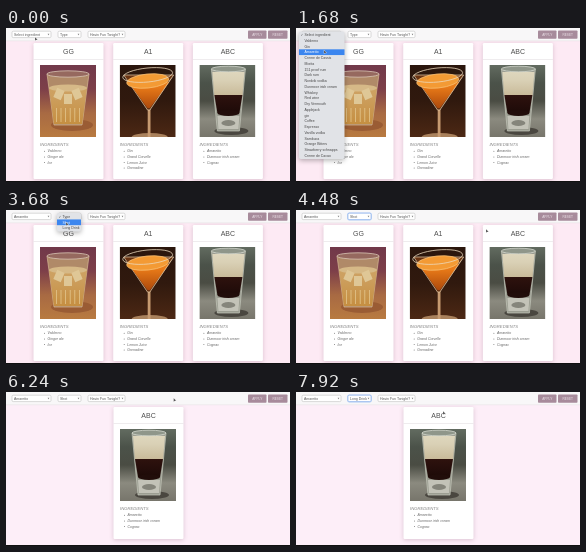
Write an HTML page with a canvas that moves like this. It is 284 px wide and 154 px high and loops after 8000 ms.

```html
<!DOCTYPE html>
<html lang="en">
<head>
<meta charset="utf-8">
<style>
html, body { margin: 0; width: 100%; height: 100%; overflow: hidden; background: #fdeaf4; }
canvas { display: block; width: 284px; height: 154px; }
</style>
</head>
<body>
<canvas id="stage" width="284" height="154"></canvas>
<script>
const ctx = document.getElementById('stage').getContext('2d');
const LOOP = 8000, GLIDE = 480;
const FONT = '"Liberation Sans", Arial, sans-serif';
const OPEN = 480, PICK = 2000, TYPE_OPEN = 3040, TYPE_PICK = 3840;
const APPLY = 5040, TYPE_REOPEN = 6640, TYPE_REPICK = 7360;
const PHOTO_W = 56, PHOTO_H = 72, ROW = 5.74;

const ingredients = ['Select ingredient', 'Valderno', 'Gin', 'Amaretto', 'Creme de Cassis', 'Morita',
  '151 proof rum', 'Dark rum', 'Nordvik vodka', 'Dunmoor irish cream', 'Whiskey', 'Red wine',
  'Dry Vermouth', 'Applejack', 'gin', 'Coffee', 'Espresso', 'Vanilla vodka', 'Sambuca',
  'Orange Bitters', 'Strawberry schnapps', 'Creme de Cacao'];
const types = ['Type', 'Shot', 'Long Drink'];
const cards = [
  { title: 'GG', items: ['Valderno', 'Ginger ale', 'Ice'], photo: tumbler },
  { title: 'A1', items: ['Gin', 'Grand Corvelle', 'Lemon Juice', 'Grenadine'], photo: martini },
  { title: 'ABC', items: ['Amaretto', 'Dunmoor irish cream', 'Cognac'], photo: shot }
];

// arrival time and place of each pointer move
const moves = [[1440, 28, 22], [2640, 57, 7], [3520, 60, 12], [4400, 190, 19],
  [4960, 250, 6], [6500, 63, 6], [7040, 64, 11], [7920, 147, 19]];

function rect(x, y, w, h, fill) {
  ctx.fillStyle = fill;
  ctx.fillRect(x, y, w, h);
}

function paint(fill, stroke, line) {
  if (fill) { ctx.fillStyle = fill; ctx.fill(); }
  if (stroke) { ctx.strokeStyle = stroke; ctx.lineWidth = line; ctx.stroke(); }
}

function box(x, y, w, h, r, fill, stroke, line = 0.6) {
  ctx.beginPath();
  ctx.roundRect(x, y, w, h, r);
  paint(fill, stroke, line);
}

function poly(points, fill, stroke, line) {
  ctx.beginPath();
  points.forEach(p => ctx.lineTo(...p));
  ctx.closePath();
  paint(fill, stroke, line);
}

function oval(x, y, rx, ry, fill, stroke, tilt = 0) {
  ctx.beginPath();
  ctx.ellipse(x, y, rx, ry, tilt, 0, Math.PI * 2);
  paint(fill, stroke, 0.8);
}

// a glass section narrowing from half-width a to half-width b
function taper(x, top, a, bottom, b, fill, stroke) {
  poly([[x - a, top], [x + a, top], [x + b, bottom], [x - b, bottom]], fill, stroke, 0.7);
}

function fade(length, ...colors) {
  const g = ctx.createLinearGradient(0, 0, 0, length);
  colors.forEach((c, i) => g.addColorStop(i / (colors.length - 1), c));
  return g;
}

function backdrop(...colors) {
  rect(0, 0, PHOTO_W, PHOTO_H, fade(PHOTO_H, ...colors));
}

function text(str, x, y, size, fill, align = 'left', style = 'normal') {
  ctx.font = `${style} ${size}px ${FONT}`;
  ctx.textAlign = align;
  ctx.fillStyle = fill;
  ctx.fillText(str, x, y);
}

function tumbler() {
  backdrop('#71394a', '#7d3f49', '#a86a43', '#b87a40');
  oval(32, 60, 21, 6, '#9a5c34');
  taper(28, 9, 21, 60, 14, '#b08a68', '#d6b994');
  taper(28, 23, 19, 59, 14, fade(60, '#d0a869', '#cda060', '#c58e40'));
  oval(28, 23, 19, 3.5, '#d6b987');
  for (let i = 0; i < 3; i++) {
    ctx.save();
    ctx.translate(19 + i * 9, 29 + i % 2 * 5);
    ctx.rotate(0.4 - i * 0.4);
    rect(-4, -5, 8, 10, '#dfc796');
    ctx.restore();
  }
  for (let i = 0; i < 6; i++) rect(16 + i * 4.6, 43, 0.8, 14, '#e3c58c');
  oval(28, 9, 21, 3.2, '#96695f', '#d8c5b4');
}

function martini() {
  backdrop('#2a160d', '#30190e', '#4c2814');
  oval(30, 72, 18, 4, '#a9815c');
  rect(28, 42, 2.8, 30, '#c69a70');
  taper(29, 10, 25, 45, 1.2, '#6a3413', '#e6cfac');
  taper(29, 17, 20.5, 43, 1.2, fade(44, '#ee8c22', '#e87a18', '#ab480c'));
  oval(28, 16, 21, 7, '#f39a34', '#f8be72', -0.1);
  oval(28, 10, 25, 7, null, '#ead9bd', -0.1);
  poly([[54, 10], [50, 15], [30, 45]], '#efd9b5');
}

function shot() {
  backdrop('#626b60', '#4b5249', '#4a4c43', '#8b8a7f', '#77756b');
  oval(32, 66, 17, 4, '#4a4740');
  taper(29, 4, 17, 66, 11, '#9c9e92', '#c4c7bb');
  taper(29, 7, 16, 31, 14, fade(31, '#e3dcc4', '#d9d0b5', '#c8b998'));
  taper(29, 30, 14, 48, 11, fade(48, '#3c1a12', '#341510', '#1d0a08'));
  oval(29, 48, 11, 3, '#210d0a');
  taper(29, 51, 11, 64, 10, '#c3c3b8');
  oval(29, 58, 7, 3, '#85857b');
  oval(29, 4, 17, 2.8, '#8f968a', '#d5d8ce');
}

function card(data, x, height) {
  ctx.save();
  ctx.shadowColor = 'rgba(115,65,95,.25)';
  ctx.shadowBlur = 4;
  ctx.shadowOffsetY = 1;
  box(x, 15, 70, height, 1.2, '#fff');
  ctx.restore();
  rect(x, 31, 70, 0.6, '#e4dfe3');
  text(data.title, x + 35, 25.6, 7, '#505050', 'center');

  ctx.save();
  ctx.translate(x + 6.5, 37);
  ctx.beginPath();
  ctx.rect(0, 0, PHOTO_W, PHOTO_H);
  ctx.clip();
  data.photo();
  ctx.restore();

  text('INGREDIENTS', x + 6.5, 117.5, 4.2, '#808080', 'left', 'italic');
  data.items.forEach((item, i) => {
    const y = 124.4 + i * 5.6;
    oval(x + 11, y - 1.1, 0.5, 0.5, '#777');
    text(item, x + 14, y, 3.5, '#666', 'left', 'italic');
  });
}

function select(label, x, w, focus) {
  if (focus) box(x, 3.2, w, 6.4, 1.2, null, '#b5d0f6', 1.6);
  box(x, 3.2, w, 6.4, 1.2, '#fff', focus ? '#85a9e8' : '#c2c2c2');
  text(label, x + 2, 7.6, 3.5, '#555');
  taper(x + w - 2.5, 5.8, 0.9, 7.2, 0.1, '#888');
}

function menu(items, x, y, w, checked, active) {
  ctx.save();
  ctx.shadowColor = 'rgba(0,0,0,.3)';
  ctx.shadowBlur = 5;
  ctx.shadowOffsetY = 1.5;
  box(x, y, w, items.length * ROW + 1.4, 1.8, '#e1e3e7');
  ctx.restore();
  items.forEach((item, i) => {
    const top = y + 0.7 + i * ROW;
    const base = top + ROW * 0.72;
    const color = i === active ? '#fff' : '#444';
    if (i === active) rect(x, top, w, ROW, '#3b86ef');
    if (i === checked) text('✓', x + 1.5, base, 3.4, color);
    text(item, x + 5.5, base, 3.5, color);
  });
}

function button(label, x, w) {
  box(x, 2.4, w, 8.4, 0.8, '#a78b9b');
  text(label, x + w / 2, 7.8, 3.2, '#eee4ea', 'center');
}

function pointerAt(t) {
  let [x, y] = [29, 9];
  for (const [end, toX, toY] of moves) {
    const p = Math.min(1, Math.max(0, (t - end + GLIDE) / GLIDE));
    const ease = p * p * (3 - 2 * p);
    x += (toX - x) * ease;
    y += (toY - y) * ease;
  }
  return [x, y];
}

function pointer(x, y) {
  poly([[x, y], [x, y + 3.8], [x + 1.1, y + 3], [x + 2.7, y + 2.8]], '#333', '#fff', 0.4);
}

function header(t) {
  rect(0, 0, 284, 13, '#f8f7f8');
  rect(0, 12.6, 284, 0.6, '#e6dee3');
  const type = t < TYPE_PICK ? 0 : t < TYPE_REPICK ? 1 : 2;
  select(t < PICK ? ingredients[0] : 'Amaretto', 6, 39, t >= PICK && t < TYPE_OPEN);
  select(types[type], 52, 23, (t >= TYPE_PICK && t < APPLY) || t >= TYPE_REPICK);
  select('Havin Fun Tonight?', 82, 37, false);
  button('APPLY', 242, 18.5);
  button('RESET', 262, 19.5);
}

function draw(t) {
  const filtered = t >= APPLY;
  rect(0, 0, 284, 154, filtered ? '#fdeef8' : '#fdeaf4');
  if (filtered) card(cards[2], 107.5, 132);
  else cards.forEach((data, i) => card(data, 27.5 + i * 79.7, 136));
  rect(0, 153, 284, 1, '#111');
  header(t);

  const [x, y] = pointerAt(t);
  const row = top => Math.max(0, Math.floor((y - top) / ROW));
  if (t >= OPEN && t < PICK) menu(ingredients, 3, 3.4, 45.5, 0, row(4));
  if (t >= TYPE_OPEN && t < TYPE_PICK) menu(types, 51, 3, 24, 0, row(4));
  if (t >= TYPE_REOPEN && t < TYPE_REPICK) menu(types, 51, -2.7, 24, 1, 1);
  pointer(x, y);
}

function tick() {
  draw(performance.now() % LOOP);
  requestAnimationFrame(tick);
}
tick();
</script>
</body>
</html>
```
